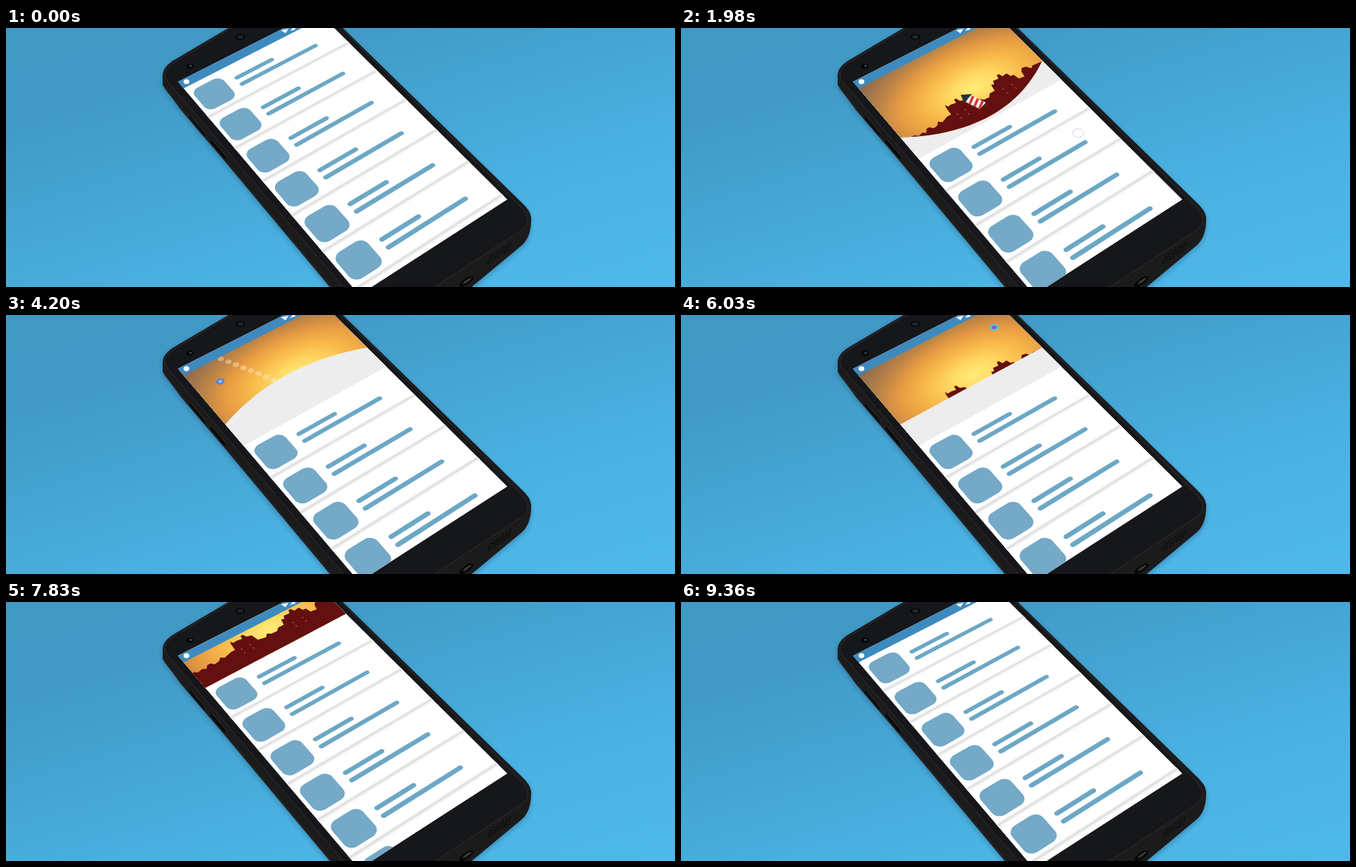
These frames come from a looping animation (888 px wide and 345 px high, 9.39 s). An HTML page with a canvas:

```html
<!DOCTYPE html>
<html lang="en">
<head>
<meta charset="utf-8">
<title>Pull to refresh</title>
<style>
  html, body { margin: 0; width: 100%; height: 100%; overflow: hidden; background: #48a9d8; }
  canvas { display: block; width: 888px; height: 345px; }
</style>
</head>
<body>
<canvas id="stage" width="888" height="345"></canvas>
<script>
const W = 888, H = 345, LOOP = 9390;
const ctx = document.getElementById('stage').getContext('2d');

// Screen space: u runs 0..1 across the display, v counts list rows downwards.
const TOP = -1.184, BAR = -0.95, BOTTOM = 5.15;
const HEADER = 0.66;          // lowest flat edge of the header picture
const PULL = 2.283;           // full pull distance in rows
const ROWS = 3.5;             // rows per display width

const clamp = (x, a = 0, b = 1) => Math.min(b, Math.max(a, x));
const span = (t, a, b) => clamp((t - a) / (b - a));
const mix = (a, b, k) => a + (b - a) * k;
const ease = k => (1 - Math.cos(Math.PI * k)) / 2;

function project(u, v) {
  const w = 1 + 0.0636 * u - 0.0225 * v;
  return [
    (267.3 + 216.3 * u + 28.5 * v) / w + 0.5,
    (118 - 98.2 * u + 38.1 * v) / w + 0.5
  ];
}

function trace(points) {
  ctx.beginPath();
  points.forEach(([u, v], i) => ctx[i ? 'lineTo' : 'moveTo'](...project(u, v)));
  ctx.closePath();
}

function fill(points, color) {
  trace(points);
  ctx.fillStyle = color;
  ctx.fill();
}

const box = (u0, v0, u1, v1) => [[u0, v0], [u1, v0], [u1, v1], [u0, v1]];

function rounded(u0, v0, u1, v1, ru, rv) {
  const points = [];
  const corners = [[u1 - ru, v1 - rv], [u0 + ru, v1 - rv], [u0 + ru, v0 + rv], [u1 - ru, v0 + rv]];
  corners.forEach(([u, v], q) => {
    for (let i = 0; i <= 8; i++) {
      const a = (q + i / 8) * Math.PI / 2;
      points.push([u + ru * Math.cos(a), v + rv * Math.sin(a)]);
    }
  });
  return points;
}

const disc = (u, v, r) => rounded(u - r, v - r * ROWS, u + r, v + r * ROWS, r, r * ROWS);

// Runs draw() in a local frame whose unit is the display width.
function local(u, v, angle, draw) {
  const [x, y] = project(u, v);
  const [ax, ay] = project(u - 0.05, v), [bx, by] = project(u + 0.05, v);
  const [cx, cy] = project(u, v - 0.05), [dx, dy] = project(u, v + 0.05);
  ctx.save();
  ctx.transform((bx - ax) * 10, (by - ay) * 10,
    (dx - cx) * 10 * ROWS, (dy - cy) * 10 * ROWS, x, y);
  ctx.rotate(angle);
  draw();
  ctx.restore();
}

function addStops(gradient, stops) {
  stops.forEach(([k, color]) => gradient.addColorStop(k, color));
  return gradient;
}

// ---------- backdrop and handset ----------
function makePhone() {
  const canvas = document.createElement('canvas');
  canvas.width = W;
  canvas.height = H;
  const c = canvas.getContext('2d');

  c.fillStyle = addStops(c.createLinearGradient(0, 0, 170.5, 564.5),
    [[0, '#4098c3'], [0.2, '#4099c5'], [0.7, '#4ab3e4'], [1, '#4fb9eb']]);
  c.fillRect(0, 0, W, H);

  const body = new Path2D('M302-4 L226 41 Q206 52 208 66 L208 76 L232 109 L290 177 L434 350' +
    ' L612 350 L684 290 Q698 278 697 252 Q696 243 684 232 L443-4Z');
  c.save();
  c.shadowColor = 'rgba(15,55,85,.35)';
  c.shadowBlur = 7;
  c.shadowOffsetY = 3;
  c.fillStyle = '#1c1b1c';
  c.fill(body);
  c.restore();

  const face = new Path2D('M306-4 L229 42 Q206 54 212 68 L452 350 L562 350 L686 268' +
    ' Q699 257 686 241 L441-4Z');
  c.fillStyle = '#15171a';
  c.fill(face);
  c.strokeStyle = '#323032';
  c.lineWidth = 0.9;
  c.stroke(face);

  const line = (path, color, width) => {
    c.strokeStyle = color;
    c.lineWidth = width;
    c.stroke(new Path2D(path));
  };
  line('M244 119 L264 143 M272 150 L291 173', '#0a0a0a', 4);
  line('M246 118 L266 142 M274 149 L293 172', '#3c3a39', 0.8);
  line('M210 80 L432 345', '#302d2c', 0.7);

  const spot = (x, y, rx, ry, color, tilt = -0.5) => {
    c.beginPath();
    c.ellipse(x, y, rx, ry, tilt, 0, 7);
    c.fillStyle = color;
    c.fill();
  };
  spot(311, 12, 6.5, 4, '#050607', 0);
  spot(311, 12, 4, 2.4, '#20262b', 0);
  spot(244, 51, 5, 3.6, '#050607', 0);
  spot(245, 50.5, 1.8, 1.4, '#38424a', 0);
  for (let i = 0; i < 7; i++)
    for (let j = 0; j < 4; j++)
      spot(643 + i * 4.4 - j, 304 - i * 2.9 + j * 3.2, 1.2, 0.9, '#080808');
  spot(611, 338, 11, 4, '#060606', -0.6);
  spot(612, 337, 7, 1.5, '#3d3b3a', -0.6);
  return canvas;
}

// ---------- list ----------
function drawList(pull) {
  fill(box(0, TOP, 1, BOTTOM), '#fff');
  for (let i = 0; i < 7; i++) {
    const v = pull + i;
    if (v > BOTTOM + 1) break;
    fill(box(0, v - 0.04, 1, v + 0.06), '#f3f3f4');
    fill(box(0, v - 0.015, 1, v + 0.025), '#dfdfe0');
    fill(rounded(0.023, v - 0.805, 0.223, v - 0.105, 0.05, 0.175), '#74a9c7');
    fill(rounded(0.282, v - 0.605, 0.556, v - 0.505, 0.014, 0.05), '#6ca7c5');
    fill(rounded(0.28, v - 0.395, 0.834, v - 0.295, 0.014, 0.05), '#6ca7c5');
  }
}

// ---------- header ----------
// Skyline: position across, height in rows.
const SKYLINE = [
  -.2, .5, .02, .5, .04, .44, .07, .47, .09, .42, .11, .5, .13, .5, .15, .43, .18, .45, .2, .52, .22, .46,
  .27, .52, .3, .52, .305, .7, .312, .78, .32, .71, .345, .72, .38, .7, .385, .79, .4, .79, .41, .7, .44, .66,
  .45, .48, .5, .44, .52, .52, .54, .46, .58, .45, .6, .52, .64, .52, .65, .68, .67, .66, .68, .74, .72, .73,
  .73, .82, .745, .82, .755, .73, .79, .75, .8, .64, .82, .64, .83, .5, .87, .48, .88, .62, .9, .69, .93, .67,
  .95, .57, .97, .62, 1.2, .56];

function drawCity(pull) {
  const width = mix(1.02, 0.9, span(pull, 1.3, PULL));
  const height = mix(1, 1.1, span(pull, 1.65, PULL));
  const base = pull + BAR;
  const place = (x, h) => [0.55 + (x - 0.55) * width, base - h * height];
  const points = [];
  for (let i = 0; i < SKYLINE.length; i += 2) points.push(place(SKYLINE[i], SKYLINE[i + 1]));
  points.push([1.2, base + 0.3], [-0.2, base + 0.3]);
  fill(points, '#640f10');
  for (const x of [0.33, 0.39, 0.69, 0.76])
    for (const h of [0.36, 0.48]) {
      const [u, v] = place(x, h);
      fill(box(u, v, u + 0.008, v + 0.045), '#914a2c');
    }
}

function drawSky(pull) {
  local(0.55, -1.35 + 0.78 * pull, 0, () => {
    ctx.scale(1, 0.6);
    ctx.fillStyle = addStops(ctx.createRadialGradient(0, 0, 0, 0, 0, 0.85),
      [[0, '#ffec78'], [0.17, '#ffda64'], [0.38, '#f8b94a'], [0.58, '#e69a42'],
       [0.74, '#bd8446'], [1, '#8a6a50']]);
    ctx.fillRect(-3, -3, 6, 6);
  });
}

const LAUNCH = 3720, GONE = 4080;

// The rocket climbs along this slanted line.
const flightU = v => 0.371 + v * 0.1405;

function drawTrail(t) {
  const life = 1 - span(t, 4150, 4650);
  if (t < LAUNCH || !life) return;
  const head = mix(0.74, -1.3, span(t, LAUNCH, GONE));
  for (let v = 0.9; v > head; v -= 0.163)
    fill(disc(flightU(v), v, 0.019), `rgba(255,238,205,${0.45 * life})`);
}

function drawRocket(t, pull) {
  if (t > GONE) return;
  const rise = span(pull, 1.6, PULL);
  const fly = span(t, LAUNCH, GONE);
  const v = mix(1.35, 0.74, rise) - 2.04 * fly * fly;
  const shake = t > 2000 && t < LAUNCH ? 0.05 * Math.sin((t - 2000) / 45) : 0;
  local(flightU(v) + 0.011, v, -0.36 + shake, () => {
    ctx.fillStyle = '#4d2a1a';
    ctx.fillRect(0.012, 0.05, 0.008, 0.05);
    ctx.save();
    ctx.beginPath();
    ctx.rect(-0.03, -0.045, 0.06, 0.11);
    ctx.clip();
    ctx.fillStyle = '#f4f0ea';
    ctx.fillRect(-0.1, -0.1, 0.2, 0.2);
    ctx.strokeStyle = '#cf3439';
    ctx.lineWidth = 0.015;
    ctx.beginPath();
    for (let y = -0.05; y < 0.12; y += 0.034) {
      ctx.moveTo(-0.05, y + 0.015);
      ctx.lineTo(0.05, y - 0.015);
    }
    ctx.stroke();
    ctx.restore();
    ctx.fillStyle = '#22313a';
    ctx.beginPath();
    ctx.moveTo(-0.04, -0.04);
    ctx.lineTo(0, -0.092);
    ctx.lineTo(0.04, -0.04);
    ctx.fill();
  });
}

// Bursts: start time, u, v, ring colour, core colour.
const BURSTS = [
  [4120, .148, -.365, '#4a7fd8', '#8eb6f0'], [4620, .42, -.5, '#e0568f', '#c23f86'],
  [5060, .7, -.25, '#58d4c8', '#3b6bd0'], [5500, .26, -.45, '#8a63d6', '#5a54c4'],
  [5930, .863, -.426, '#46cfd0', '#7a62c4'], [6380, .5, -.3, '#e58a4c', '#cc4a52'],
  [6850, .67, -.55, '#5d93e4', '#4a55c8']];

function drawBursts(t) {
  for (const [start, u, v, ring, core] of BURSTS) {
    const k = (t - start) / 600;
    if (k < 0 || k >= 1) continue;
    const grow = 1 - (1 - k) ** 2;
    ctx.globalAlpha = 1 - span(k, 0.5, 1);
    if (k < 0.4) {
      const r = 0.005 + 0.075 * grow;
      fill(disc(u, v, r), ring);
      fill(disc(u, v, r * 0.55), core);
    }
    if (k > 0.25)
      for (let i = 0; i < 7; i++) {
        const a = i * 0.9 + start;
        const d = (0.1 + 0.04 * (i % 3)) * grow;
        fill(disc(u + d * Math.cos(a), v + d * ROWS * Math.sin(a), 0.006 * (1.2 - k)), core);
      }
    ctx.globalAlpha = 1;
  }
}

function drawHeader(t, pull) {
  const edge = Math.min(HEADER, pull + BAR);
  const bend = bendAt(t, pull);
  const shape = [[0, TOP], [1, TOP]];
  for (let i = 30; i >= 0; i--) {
    const u = i / 30;
    shape.push([u, edge + 4 * bend * u * (1 - u)]);
  }
  fill(box(0, TOP, 1, pull + BAR), '#ededed');
  ctx.save();
  trace(shape);
  ctx.clip();
  drawSky(pull);
  drawCity(pull);
  drawTrail(t);
  drawRocket(t, pull);
  drawBursts(t);
  ctx.restore();
}

function drawStatusBar() {
  fill(box(0, TOP, 1, BAR), '#3e8abf');
  ctx.fillStyle = '#fff';
  ctx.beginPath();
  ctx.ellipse(239.5, 71.5, 3.8, 3.2, 0, 0, 7);
  ctx.fill();
  ctx.fill(new Path2D('M365 3 L375 1 L371 7Z M377 4 L383-3 L384 2Z'));
}

function drawTouch(t, pull) {
  const alpha = span(t, 30, 180) * (1 - span(t, 1980, 2130));
  if (!alpha) return;
  const drag = ease(span(t, 850, 1850));
  ctx.globalAlpha = alpha;
  fill(disc(mix(0.496, 0.83, drag), pull - 0.26 + 0.65 * drag, 0.031), 'rgba(255,255,255,.5)');
  ctx.strokeStyle = '#cfd3e4';
  ctx.lineWidth = 1;
  ctx.stroke();
  ctx.globalAlpha = 1;
}

// ---------- timeline ----------
function pullAt(t) {
  if (t < 7680) return PULL * ease(span(t, 30, 1143));
  return PULL * (1 - span(t, 7680, 8370)) ** 4;
}

// Sag of the header's lower edge: stretched by the pull, then springing back.
function bendAt(t, pull) {
  const s = t - 3700;
  if (s < 0) return 0.6 * span(pull, HEADER - BAR, PULL);
  return 0.6 * Math.cos(Math.PI * s / 500) * Math.exp(-((s / 600) ** 4));
}

const phone = makePhone();

function draw(t) {
  const pull = pullAt(t);
  ctx.drawImage(phone, 0, 0);
  ctx.save();
  trace(box(0, TOP, 1, BOTTOM));
  ctx.clip();
  drawList(pull);
  if (pull > 0.002) drawHeader(t, pull);
  drawStatusBar();
  drawTouch(t, pull);
  ctx.restore();
}

const begin = performance.now();

function tick() {
  draw((performance.now() - begin) % LOOP);
  requestAnimationFrame(tick);
}
tick();
</script>
</body>
</html>
```
